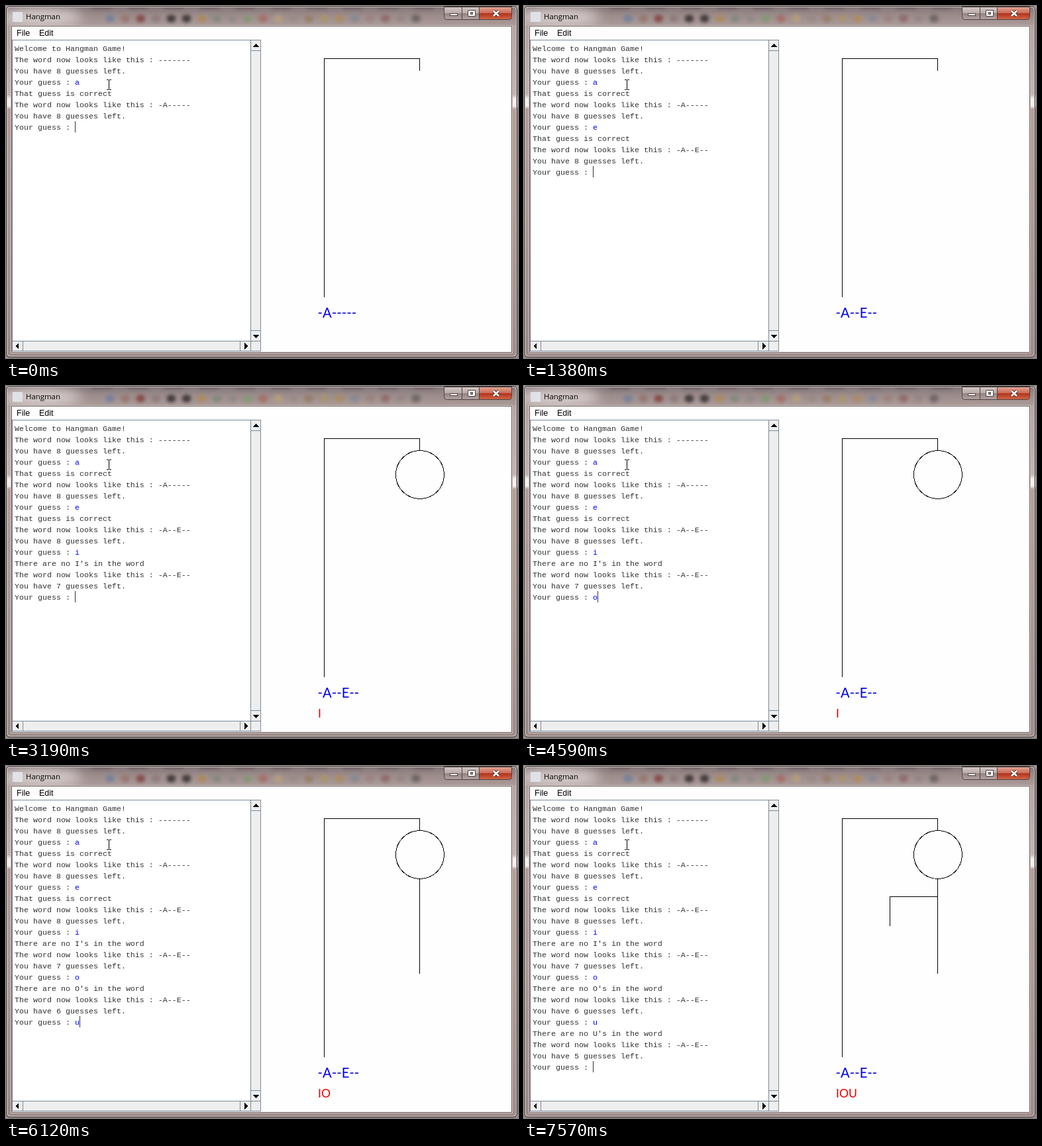
Recreate the animation shown at these times as an HTML page. Size 773 px wide and 532 px high, loop 8 s.

```html
<!DOCTYPE html>
<html lang="en">
<head>
<meta charset="utf-8">
<title>Hangman</title>
<style>
  html, body { margin: 0; width: 100%; height: 100%; overflow: hidden; background: #fff; }
  svg { display: block; width: 773px; height: 532px; }
  .crisp { shape-rendering: crispEdges; }
  .edge { stroke: #7a8a99; }
  .ink { fill: none; stroke: #000; }
  #console { font: 11.667px "Liberation Mono", monospace; fill: #333; }
  #console .typed { fill: #00f; }
  .menu { font: 12.5px "Liberation Sans", sans-serif; }
  .title { font: 11.4px "Open Sans", sans-serif; }
  .word { font: 20.2px Lato, sans-serif; fill: #0000e8; }
  .missed { font: 17.6px Lato, sans-serif; fill: #e80000; }
</style>
</head>
<body>
<svg viewBox="0 0 773 532">
  <defs>
    <linearGradient id="glass" x2="0" y2="1">
      <stop offset="0" stop-color="#85767a"/>
      <stop offset=".4" stop-color="#9a8b8a"/>
      <stop offset="1" stop-color="#ab9c9a"/>
    </linearGradient>
    <linearGradient id="side" x2="0" y2="1">
      <stop offset="0" stop-color="#b0a19f"/>
      <stop offset=".25" stop-color="#c2b4b1"/>
      <stop offset=".262" stop-color="#f4efed"/>
      <stop offset=".283" stop-color="#f4efed"/>
      <stop offset=".292" stop-color="#b59e98"/>
      <stop offset=".6" stop-color="#ae9a95"/>
      <stop offset="1" stop-color="#9c8c89"/>
    </linearGradient>
    <linearGradient id="button" x2="0" y2="1">
      <stop offset="0" stop-color="#d5cac8"/>
      <stop offset=".48" stop-color="#b9aaa7"/>
      <stop offset=".5" stop-color="#918280"/>
      <stop offset="1" stop-color="#b5a5a2"/>
    </linearGradient>
    <linearGradient id="close" x2="0" y2="1">
      <stop offset="0" stop-color="#e3a798"/>
      <stop offset=".48" stop-color="#cb6a55"/>
      <stop offset=".5" stop-color="#b0301a"/>
      <stop offset="1" stop-color="#d2694a"/>
    </linearGradient>
    <filter id="blur" x="-50%" y="-50%" width="200%" height="200%">
      <feGaussianBlur stdDeviation="2.6"/>
    </filter>
    <filter id="haze" x="-50%" y="-100%" width="200%" height="300%">
      <feGaussianBlur stdDeviation="9"/>
    </filter>
    <clipPath id="bar"><rect x="2" y="2" width="768" height="27"/></clipPath>
  </defs>

  <!-- window frame -->
  <rect width="773" height="532" fill="url(#side)"/>
  <rect width="772" height="531" rx="6" fill="#35302f"/>
  <rect x="1" y="1" width="770" height="529" rx="5" fill="#d3c7c4"/>
  <rect x="2" y="2" width="768" height="527" rx="5" fill="url(#side)"/>
  <rect x="2" y="2" width="768" height="28" rx="5" fill="url(#glass)"/>
  <g clip-path="url(#bar)">
    <ellipse cx="52" cy="17" rx="62" ry="13" fill="#d8cfce" filter="url(#haze)"/>
    <g id="blobs" filter="url(#blur)"></g>
  </g>
  <rect x="10" y="9" width="15" height="15" fill="#e0e2e7"/>
  <text class="title" x="30" y="20">Hangman</text>

  <!-- caption buttons -->
  <g stroke="#4d4241">
    <path d="M661.5 1.5H688.5V20.5H665.5Q661.5 20.5 661.5 16.5Z" fill="url(#button)"/>
    <path d="M688.5 1.5H714.5V20.5H688.5Z" fill="url(#button)"/>
    <path d="M714.5 1.5H763.5V16.5Q763.5 20.5 759.5 20.5H714.5Z" fill="url(#close)"/>
    <rect x="670.5" y="11.5" width="11" height="3" fill="#fff"/>
    <path d="M697.5 6.5H708.5V15.5H697.5ZM701.5 9.5V12.5H704.5V9.5Z" fill="#fff" fill-rule="evenodd"/>
  </g>
  <path d="M736 7.5L744 15M744 7.5L736 15" stroke="#5c2a22" stroke-width="4.6"/>
  <path d="M736 7.5L744 15M744 7.5L736 15" stroke="#fff" stroke-width="2.6"/>

  <!-- client area -->
  <g class="crisp">
    <rect x="7.5" y="29.5" width="757" height="495" fill="none" stroke="#d3c7c4"/>
    <rect x="8.5" y="30.5" width="755" height="493" fill="#fefefe" stroke="#6a5d5b"/>
    <rect x="9.5" y="51.5" width="375" height="470" class="edge" fill="#fff"/>
    <rect x="369.5" y="51.5" width="15" height="455" class="edge" fill="#eee"/>
    <rect x="9.5" y="506.5" width="360" height="15" class="edge" fill="#eee"/>
    <rect x="370" y="507" width="14" height="14" fill="#eee"/>
    <path class="edge" d="M370 67.5H384M370 490.5H384M25.5 507V521M353.5 507V521"/>
    <path d="M372 62L377 57L382 62ZM372 497H382L377 502ZM19 509V519L14 514ZM360 509V519L365 514Z"/>
  </g>
  <text class="menu" x="16" y="45">File</text>
  <text class="menu" x="50" y="45">Edit</text>

  <g id="console"></g>
  <rect id="caret" class="crisp" width="1" height="17" fill="#333"/>
  <path class="ink crisp" d="M152 111.5H155M156 111.5H159M155.5 112V126M152 126.5H155M156 126.5H159"/>

  <!-- drawing -->
  <g id="board">
    <path class="ink crisp" d="M480.5 440V79.5H624.5V98"/>
    <circle class="ink crisp" cx="625" cy="134" r="36.5" data-from="3190"/>
    <path class="ink crisp" d="M624.5 170V314" data-from="4980"/>
    <path class="ink crisp" d="M624 197.5H552.5V242" data-from="6620"/>
    <text class="word" x="470.5" y="471" data-to="1380">-A-----</text>
    <text class="word" x="470.5" y="471" data-from="1380">-A--E--</text>
    <text class="missed" x="471" y="501" data-from="3190" data-to="4980">I</text>
    <text class="missed" x="471" y="501" data-from="4980" data-to="6620">IO</text>
    <text class="missed" x="471" y="501" data-from="6620">IOU</text>
  </g>
</svg>
<script>
const LOOP = 8000, LEFT = 13, TOP = 55, ROW = 17, CHAR = 7;
const $ = id => document.getElementById(id);

function add(parent, tag, attrs, text = "") {
  const node = document.createElementNS("http://www.w3.org/2000/svg", tag);
  for (const key in attrs) node.setAttribute(key, attrs[key]);
  node.textContent = text;
  parent.append(node);
}

// blurred toolbar icons seen through the title bar
const tints = ["#6c7c9c", "#96706a", "#7d3a34", "#8a7775", "#2a2424", "#2a2424", "#b08a54", "#7c8878",
  "#8f8a86", "#7f9a72", "#a8665e", "#b9a07a", "#9a8a86", "#987a60", "#ab9468", "#b08a5a"];
for (let i = 0; i < 21; i++) {
  add($("blobs"), "ellipse", {
    cx: 157 + i * 23.1, cy: 19, rx: 7, ry: 6,
    fill: tints[i % tints.length], opacity: i > 15 ? 0.4 : 0.75
  });
}
for (let i = 0; i < 12; i++) {
  add($("blobs"), "rect", { x: 130 + i * 54, y: 0, width: 30, height: 5, fill: "#5e5052", opacity: 0.5 });
}

let row = 0;
const prompts = [];
function say(from, text) {
  add($("console"), "text", { x: LEFT, y: TOP + 13 + ROW * row++, "data-from": from }, text);
}
function status(from, word, left) {
  say(from, `The word now looks like this : ${word}`);
  say(from, `You have ${left} guesses left.`);
  prompts.push({ from, row });
  say(from, "Your guess :");
}
function guess(typed, sent, letter, correct, word, left) {
  const prompt = prompts[prompts.length - 1];
  prompt.typed = typed;
  add($("console"), "text", {
    class: "typed", x: LEFT + 13 * CHAR, y: TOP + 13 + ROW * prompt.row, "data-from": typed
  }, letter);
  say(sent, correct ? "That guess is correct" : `There are no ${letter.toUpperCase()}'s in the word`);
  status(sent, word, left);
}

say(0, "Welcome to Hangman Game!");
status(0, "-------", 8);
guess(0, 0, "a", true, "-A-----", 8);
guess(970, 1380, "e", true, "-A--E--", 8);
guess(2760, 3190, "i", false, "-A--E--", 7);
guess(4590, 4980, "o", false, "-A--E--", 6);
guess(6120, 6620, "u", false, "-A--E--", 5);

const caretOff = [[410, 970], [1930, 2510], [3780, 4310], [5570, 5970], [7140, 7570]];
const timed = [...document.querySelectorAll("[data-from], [data-to]")].map(node => ({
  node, from: +(node.dataset.from || 0), to: +(node.dataset.to || LOOP)
}));
const show = (node, on) => { node.style.visibility = on ? "visible" : "hidden"; };

function draw() {
  const t = performance.now() % LOOP;
  for (const { node, from, to } of timed) show(node, t >= from && t < to);
  const prompt = prompts.filter(p => t >= p.from).pop();
  const column = t >= prompt.typed ? 14 : 13;
  $("caret").setAttribute("x", LEFT + column * CHAR);
  $("caret").setAttribute("y", TOP + ROW * prompt.row);
  show($("caret"), !caretOff.some(([a, b]) => t >= a && t < b));
  requestAnimationFrame(draw);
}
draw();
</script>
</body>
</html>
```
